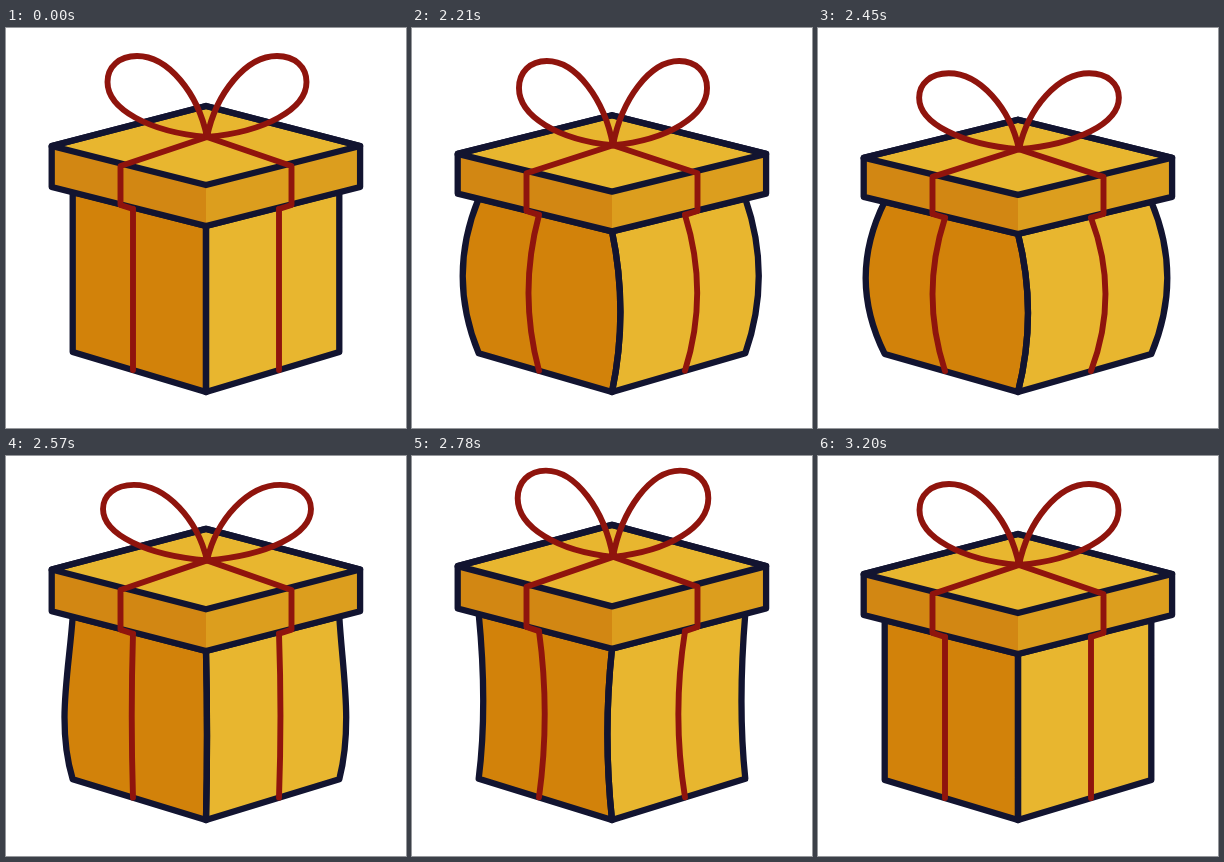
These frames come from a looping animation (400 by 400 pixels, 3.23 s). An HTML page with a canvas:

```html
<!DOCTYPE html>
<html lang="en">
<head>
<meta charset="utf-8">
<title>Bouncing gift box</title>
<style>
  html, body { margin: 0; width: 100%; height: 100%; overflow: hidden; background: #fff; }
  canvas { display: block; width: 400px; height: 400px; }
</style>
</head>
<body>
<canvas id="stage" width="400" height="400"></canvas>
<script>
const ctx = document.getElementById('stage').getContext('2d');
const LOOP = 3230, START = 2030, STEP = 30;
const PRESS = 2000, RELEASE = 2450, PEAK = 2660, END = 3200;
const FLOOR = 364, CENTER = 200;
const NAVY = '#121430', RED = '#8f140d', GOLD = '#e8b62f', AMBER = '#d2820a';
const LID_LEFT = '#d28713', LID_RIGHT = '#dc9e1e';
const OUTLINE = 6.3, RIBBON = 5.9;

const progress = (t, from, to) => Math.min(1, Math.max(0, (t - from) / (to - from)));
const easeOut = (t, from, to) => Math.sin(progress(t, from, to) * Math.PI / 2);
const easeInOut = (t, from, to) => (1 - Math.cos(progress(t, from, to) * Math.PI)) / 2;
const settle = (t, from) => 1 - (1 - progress(t, from, END)) ** 2.5;

// The box is pressed down, springs past its rest height and settles.
const boxHeight = t => 1 - 0.048 * easeOut(t, PRESS, RELEASE) +
  0.108 * easeInOut(t, RELEASE, PEAK) - 0.06 * settle(t, PEAK);

// The walls bulge out under pressure and pinch in by `pinch` on the rebound.
const bulge = (t, pinch, lag) => easeOut(t, PRESS, 2330) -
  (1 + pinch) * easeInOut(t, RELEASE + lag, PEAK + lag) + pinch * settle(t, PEAK + lag);

// The bow trails behind the lid.
const bowHeight = t => 1 + 0.04 * easeInOut(t, PRESS, 2200) - 0.11 * easeInOut(t, 2200, 2500) +
  0.17 * easeInOut(t, 2560, 2680) - 0.1 * settle(t, 2700);
const bowWidth = t => 1 - 0.055 * easeInOut(t, PRESS, 2210) + 0.1 * easeInOut(t, 2300, 2570) -
  0.11 * easeInOut(t, 2570, 2680) + 0.065 * settle(t, 2700);

function paint(path, fill, stroke, width) {
  if (fill) { ctx.fillStyle = fill; ctx.fill(path); }
  if (stroke) { ctx.strokeStyle = stroke; ctx.lineWidth = width; ctx.stroke(path); }
}

function draw(t) {
  const height = boxHeight(t), bowW = bowWidth(t), bowH = bowHeight(t);
  const upper = bulge(t, 0.4, 0), lower = bulge(t, 0.4, 50), inner = bulge(t, 0.8, 15);
  const sy = y => FLOOR - (FLOOR - y) * height;

  const poly = (points, closed) => {
    const p = new Path2D();
    points.forEach(([x, y]) => p.lineTo(x, sy(y)));
    if (closed) p.closePath();
    return p;
  };
  // Adds a bulging vertical edge from the current point to (x, to).
  const edge = (p, x, from, to, c1, c2) =>
    p.bezierCurveTo(x + c1 / 0.75, sy(from + (to - from) / 3),
      x + c2 / 0.75, sy(to - (to - from) / 3), x, sy(to));
  const wall = (x, depth) => {
    const p = new Path2D();
    p.moveTo(CENTER, sy(198));
    p.lineTo(x, sy(164));
    edge(p, x, 164, 324, depth * upper, depth * lower);
    p.lineTo(CENTER, sy(FLOOR));
    edge(p, CENTER, FLOOR, 198, 10 * inner, 10 * inner);
    return p;
  };
  const strip = (x, depth) => {
    const p = new Path2D();
    p.moveTo(x, sy(181));
    edge(p, x, 181, 342, depth * inner, depth * inner);
    return p;
  };

  ctx.fillStyle = '#fff';
  ctx.fillRect(0, 0, 400, 400);
  ctx.lineJoin = ctx.lineCap = 'round';

  const left = wall(66.7, -19), right = wall(333.3, 16);
  paint(left, AMBER);
  paint(right, GOLD);
  paint(left, null, NAVY, OUTLINE);
  paint(right, null, NAVY, OUTLINE);

  const lidBack = [CENTER, 78], lidFront = [CENTER, 157], lowFront = [CENTER, 198];
  const lidLeft = [45.7, 118], lidRight = [354.1, 118];
  const lowLeft = [45.7, 159], lowRight = [354.1, 159];
  paint(poly([lidLeft, lidFront, lowFront, lowLeft], true), LID_LEFT);
  paint(poly([lidRight, lidFront, lowFront, lowRight], true), LID_RIGHT);
  paint(poly([lidLeft, lidBack, lidRight, lidFront], true), GOLD, NAVY, OUTLINE);
  paint(poly([lidLeft, lidBack, lidRight, lowRight, lowFront, lowLeft], true), null, NAVY, OUTLINE);

  paint(strip(127, -12.5), null, RED, RIBBON);
  paint(strip(273, 14.5), null, RED, RIBBON);
  paint(poly([[127, 181], [114.5, 177], [114.5, 138], [201, 109],
    [285.5, 138], [285.5, 177], [273, 181]]), null, RED, RIBBON);

  for (const dir of [-1, 1]) {
    const x = dx => 201 + dir * dx * bowW;
    const y = dy => sy(109) - dy * bowH;
    const p = new Path2D();
    p.moveTo(x(0), y(0));
    p.bezierCurveTo(x(9), y(44), x(39), y(81), x(70), y(81));
    p.bezierCurveTo(x(88), y(81), x(99.5), y(70), x(99.5), y(55));
    p.bezierCurveTo(x(99.5), y(28), x(58), y(5), x(0), y(0));
    paint(p, null, RED, RIBBON);
  }
}

const origin = performance.now();
function tick() {
  const t = (performance.now() - origin) % LOOP;
  draw(t < START ? 0 : START + STEP * Math.floor((t - START) / STEP));
  requestAnimationFrame(tick);
}
tick();
</script>
</body>
</html>
```
